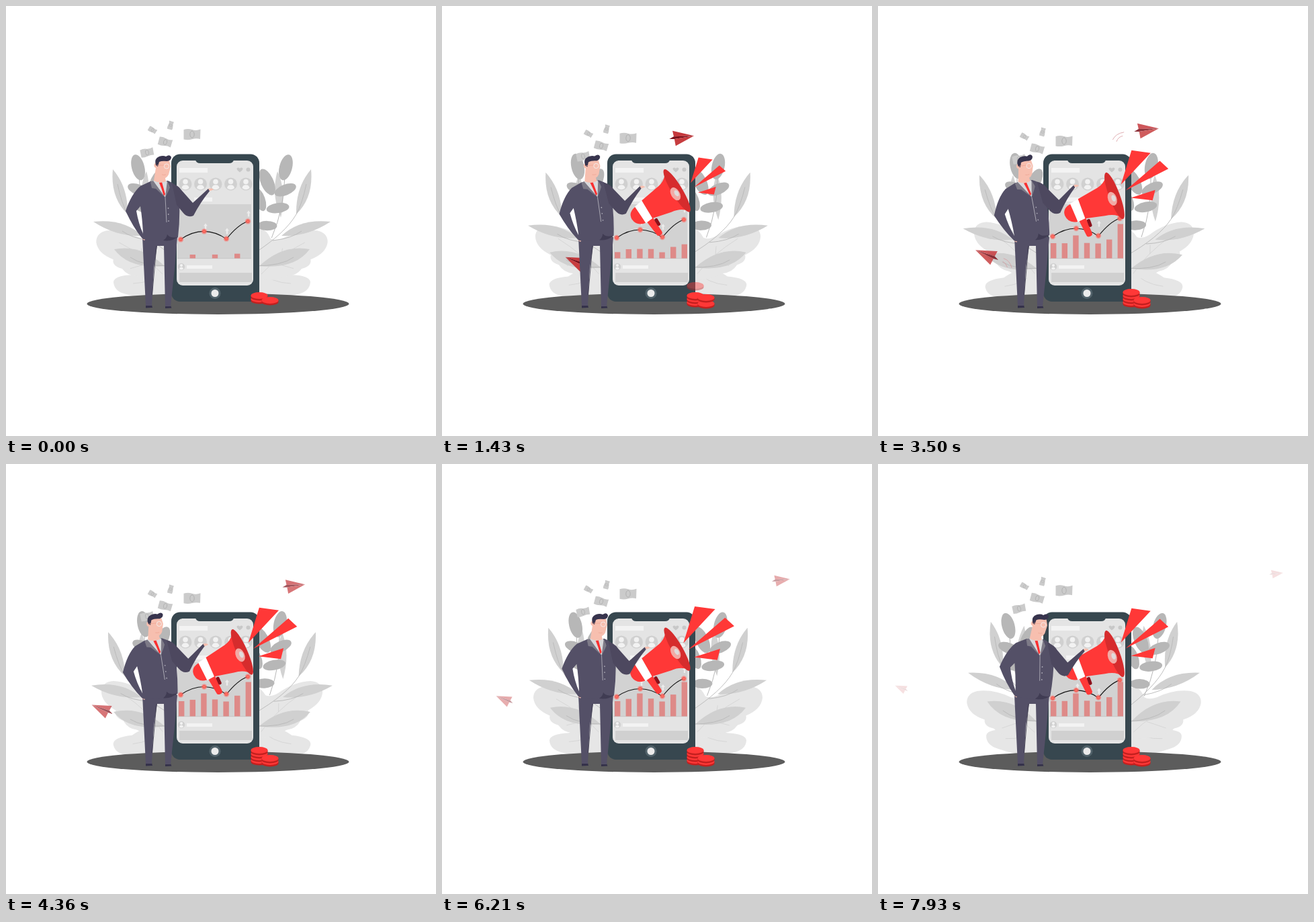
An HTML page for the animation above (8 s loop, 640 px wide and 640 px high).

```html
<!DOCTYPE html>
<html lang="en">
<head>
<meta charset="utf-8">
<title>Mobile marketing</title>
<style>
  html, body { margin: 0; width: 100%; height: 100%; overflow: hidden; background: #fff; }
  svg { display: block; width: 100vw; height: 100vh; }
</style>
</head>
<body>
<svg id="stage" viewBox="0 0 640 640">
  <defs>
    <g id="avatar">
      <circle r="9.5" fill="#d0d0d0"/>
      <circle cy="-3.5" r="3.8" fill="#f2f2f2"/>
      <path d="M-5.5 6Q-5 1.2 0 1.2Q5 1.2 5.5 6Q0 10.5-5.5 6Z" fill="#f2f2f2"/>
    </g>
    <path id="arrow" d="M0-4.5L3-.5H1.2V4.5H-1.2V-.5H-3Z" fill="#ececec"/>
    <g id="note">
      <path d="M-12.5-7Q-6-9 0-7T12.5-7.5L12 7Q6 5.5 0 7.2T-12.5 7.5Z" fill="#cbcbcb"/>
      <ellipse rx="3.2" ry="5" fill="none" stroke="#aaa" stroke-width=".8"/>
    </g>
    <g id="coin">
      <path d="M-12.5 0V2.5A12.5 5 0 0 0 12.5 2.5V0Z" fill="#c4201f"/>
      <ellipse rx="12.5" ry="5" fill="#ff3837"/>
    </g>
    <g id="plane">
      <path d="M-15-11L19-3L-13-2Z" fill="#c5383c"/>
      <path d="M-13-2L19-3L-12 2L-20 2Z" fill="#7a0e18"/>
      <path d="M-12 2L19-3L-10 13Z" fill="#c73d3f"/>
    </g>
  </defs>

  <g id="foliage">
    <g id="lowerLobe">
      <path d="M370 385Q405 388 424 400Q452 401 453 411Q452 425 434 429Q400 438 370 434Z" fill="#e6e6e6"/>
      <path d="M376 394Q395 412 424 413" fill="none" stroke="#d3d3d3" stroke-width=".8"/>
    </g>
    <g id="upperLobe">
      <path d="M370 335Q384 326 393 346Q400 350 412 345Q438 331 462 333Q478 336 478 350Q476 367 453 376Q455 386 440 390Q432 401 418 401Q395 412 370 405Z" fill="#e6e6e6"/>
      <path d="M380 399Q404 372 444 351M409 373L411 360M399 382L428 390" fill="none" stroke="#d3d3d3" stroke-width=".8"/>
    </g>
    <g id="paleBranch">
      <path d="M409 315Q394 280 404 246Q418 275 409 315Z" fill="#d2d2d2"/>
      <path d="M432 310Q431 270 454 243Q458 285 432 310Z" fill="#d0d0d0"/>
      <path d="M410 342Q438 316 483 321Q448 344 410 342Z" fill="#d0d0d0"/>
      <path d="M377 387Q412 354 452 362Q430 392 377 387Z" fill="#d0d0d0"/>
      <path d="M447 265Q441 294 432 310Q416 338 368 369M397 349Q425 346 440 335M370 387Q410 387 428 374" fill="none" stroke="#b9b9b9" stroke-width=".9"/>
    </g>
    <g id="darkBranch" fill="#b7b7b7">
      <path d="M414 253Q414 300 395 345" fill="none" stroke="#b0b0b0" stroke-width=".9"/>
      <ellipse cx="415.5" cy="240" rx="9.5" ry="19.5" transform="rotate(14 415.5 240)"/>
      <ellipse cx="388" cy="262" rx="9.5" ry="21" transform="rotate(-24 388 262)"/>
      <ellipse cx="415" cy="273.5" rx="17" ry="8" transform="rotate(-22 415 273.5)"/>
      <ellipse cx="404" cy="300.5" rx="17" ry="7.5" transform="rotate(-8 404 300.5)"/>
      <ellipse cx="377" cy="288" rx="8" ry="18" transform="rotate(-20 377 288)"/>
      <ellipse cx="388" cy="327" rx="15" ry="7.2"/>
    </g>
  </g>
  <use href="#foliage" transform="translate(613) scale(-1 1)"/>
  <ellipse cx="315.5" cy="443.2" rx="195" ry="15.7" fill="#5c5c5c"/>
  <g id="notes"></g>

  <g id="phone">
    <rect x="246" y="220.5" width="131" height="219.5" rx="13" fill="#37474f"/>
    <rect x="254" y="230" width="114" height="186" rx="9" fill="#e4e4e4"/>
    <path d="M282 229H339Q338 234 332 234H289Q283 234 282 229Z" fill="#37474f"/>
    <circle cx="311" cy="427.5" r="8.5" fill="#52636b"/>
    <circle cx="311" cy="427.5" r="5.5" fill="#ebebeb"/>
    <path d="M258 241H300V248H258ZM280 285H307V291H280ZM269 386H307V391H269Z" fill="#f3f3f3"/>
    <path d="M348 247.5Q342 243 344 241Q347 239.5 348 242Q349 239.5 352 241Q354 243 348 247.5Z" fill="#c8c8c8"/>
    <circle cx="360.5" cy="243.5" r="3" fill="#c8c8c8"/>
    <g id="avatars"></g>
    <rect x="255" y="295" width="110" height="80.5" fill="#d2d2d2"/>
    <path d="M255 375.7H365" stroke="#b5b5b5" stroke-width=".6"/>
    <rect x="258" y="397" width="108" height="14" fill="#d0d0d0"/>
    <g id="bars" fill="#de8a88"></g>
    <g id="arrows">
      <use href="#arrow" x="297" y="327"/><use href="#arrow" x="329" y="334"/><use href="#arrow" x="361" y="308"/>
    </g>
    <g id="graph"><path d="M260 347Q277 335 295 335Q313 335.5 328 346.5Q345 325 360 320" fill="none" stroke="#111" stroke-width="1.1"/></g>
  </g>

  <path id="rays" d="M377 214L406 218L361 266ZM420 230L433 242L368 275ZM413 274L409 290L376 286Z" fill="#ff3837"/>
  <g id="megaphone">
    <path d="M-25 20L-14 20L-13 45Q-13 49-17 49Q-22 49-22 46Z" fill="#ff3837"/>
    <rect x="-14" y="24" width="5" height="12" rx="2" fill="#8c111b"/>
    <path d="M-27-6.5Q-42-5-42 7Q-41 20-27 22Z" fill="#ff3837"/>
    <path d="M-28.5-7L-15-9.5V21.5L-27 22.5Z" fill="#fff"/>
    <path d="M-15-9.5L18-15Q32-18 38-31V41.500Q31 30 14 28L-15 21.5Z" fill="#ff3837"/>
    <ellipse cx="37.5" cy="5" rx="8" ry="36.8" fill="#d62c2d"/>
    <ellipse cx="33" cy="8" rx="6.5" ry="10.5" fill="#f2aaa5"/>
    <ellipse cx="35" cy="8" rx="3" ry="5" fill="#e0dcdc"/>
  </g>

  <g id="rightPlane">
    <use href="#plane"/>
    <path class="trail" d="M-54 15Q-49 5-36 3M-48 18Q-45 10-38 9" fill="none" stroke="#d99a9f"/>
  </g>
  <g id="leftPlane">
    <use href="#plane" transform="rotate(16) scale(-1 1)"/>
    <path class="trail" d="M27 5Q37 8 40 20M26 10Q31 13 33 19" fill="none" stroke="#d99a9f"/>
  </g>

  <g id="man">
    <path d="M208 445H217L218 449L208 449.5ZM237 446H245L246.5 449.5L237 450Z" fill="#34314a"/>
    <path d="M203 344H255L251 390L245 447H237L235 357H225L220 390L217 446H208Z" fill="#545067"/>
    <path d="M224 357L217.5 430" stroke="#39364a" stroke-width=".8"/>
    <g id="body">
      <path d="M202 343L207 342L208 346L206 349L203 347Z" fill="#f7bfaf"/>
      <path d="M215 261L241 260Q254 265 257 276Q260 310 256 344Q250 350 240 347Q220 351 204 347L202 345Q189 329 178 305Q187 279 200 268ZM200 298L194 305Q197 323 204 339Q203 317 200 298Z" fill="#545067" fill-rule="evenodd"/>
      <path d="M234 349Q239 346 240 340Q244 346 255 344Q247 351 234 349Z" fill="#403c53"/>
      <g id="arm">
        <path d="M301 272Q306 270 309 273.5L303 275.5Z" fill="#f7bfaf"/>
        <path d="M247 264Q257 267 262 275L278 293L301 272L303 275.5Q290 291 279 312Q270 316 263 307L254 296Z" fill="#4d485f"/>
      </g>
      <path d="M218 260L239 260L243 268L237 285Z" fill="#d9d9dc"/>
      <path d="M228 263L232 262L237 280L235 283L231.5 272Z" fill="#fa2f30"/>
      <path d="M215 262L219 260L237 285L223 272L217 271ZM240 260L244 270L242 275L237 285Z" fill="#7d7a87"/>
      <path d="M237 285L239 322" stroke="#c9c8ce" stroke-width=".7"/>
      <g fill="#aaa8b4"><circle cx="241.5" cy="301" r=".9"/><circle cx="241.7" cy="310" r=".9"/><circle cx="242" cy="320" r=".9"/></g>
      <path d="M226 230H243L245 239L242 251Q240 255 237 256L238 261Q229 265 220 260L223 241Q219 239 221 235Z" fill="#f7bfaf"/>
      <path d="M223 237Q220 227 228 224Q234 222 238 224Q244 220 246 225Q246 230 240 231Q232 230 228 232L226 239Z" fill="#37344d"/>
      <path d="M224 237H235.5M232 251Q235 252 238 251" fill="none" stroke="#eda391" stroke-width=".7"/>
      <circle cx="239" cy="238.5" r="3.6" fill="none" stroke="#f4eeee" stroke-width=".9"/>
    </g>
  </g>
  <g id="coins"></g>
</svg>

<script>
const LOOP = 8000;
const TURN = 3500;   // moment when the scene is at its calmest point
const $ = id => document.getElementById(id);
const clamp = v => Math.min(1, Math.max(0, v));
const wave = (t, peak, period) => Math.cos(2 * Math.PI * (t - peak) / period);
const move = (node, transform) => node.setAttribute("transform", transform);

function add(parent, name, attrs) {
  const node = document.createElementNS("http://www.w3.org/2000/svg", name);
  for (const key in attrs) node.setAttribute(key, attrs[key]);
  return parent.appendChild(node);
}

for (let i = 0; i < 5; i++) add($("avatars"), "use", { href: "#avatar", x: 267 + 22.5 * i, y: 265 });
add($("avatars"), "use", { href: "#avatar", transform: "translate(261 388) scale(.55)" });

for (const [x, y] of [[260, 347], [295, 335], [328, 346], [360, 320]]) {
  add($("graph"), "circle", { cx: x, cy: y, r: 4.2, fill: "#ff6b64", "fill-opacity": .55 });
  add($("graph"), "circle", { cx: x, cy: y, r: 2.3, fill: "#ff6f62", stroke: "#e8433f", "stroke-width": .6 });
}

for (const [x, y, angle, scale] of [
  [218, 185.5, 30, .5], [245, 178.5, -75, .5], [237, 203.5, 15, .8], [277, 192, 0, 1], [210, 219, -12, .78]
]) add($("notes"), "use", { href: "#note", transform: `translate(${x} ${y}) rotate(${angle}) scale(${scale})` });

const bars = [22.5, 26, 34, 26.5, 22, 32.5, 51].map((height, i) => ({
  height, node: add($("bars"), "rect", { x: 257 + 16.6 * i, width: 8.4 })
}));

const coins = [];
function stackCoins(x, base, dropTimes) {
  dropTimes.forEach((start, level) =>
    coins.push({ x, y: base - 5 * level, start, node: add($("coins"), "use", { href: "#coin" }) }));
}
stackCoins(377, 441, [-550, -550, 290, 1130]);
stackCoins(393, 443, [-550, 830]);

const planes = [
  { node: $("rightPlane"), rest: [400, 185], enter: [-10, 2.6], leave: [193, -21.5] },
  { node: $("leftPlane"), rest: [161.5, 371], enter: [9, 2.4], leave: [-127, -37] }
];

// Planes brake towards their resting place, then speed away while fading.
function drawPlanes(t, pop) {
  const s = (t - TURN) / 1000;
  const before = Math.min(0, s) ** 2, after = Math.max(0, s);
  const gone = .16 * after + .0148 * after * after;
  for (const { node, rest, enter, leave } of planes) {
    const [x, y] = rest.map((v, axis) => v + enter[axis] * before + leave[axis] * gone);
    move(node, `translate(${x} ${y}) scale(${pop * (.94 - .093 * after)})`);
    node.setAttribute("opacity", clamp(.84 - .155 * s));
    node.querySelector(".trail").setAttribute("opacity", clamp(1 - Math.abs(s) / .7));
  }
}

function drawLeaves(t, drift) {
  const sway = -.9 + (t < TURN ? .9 : 1.25) * (Math.abs(t - TURN) / TURN) ** 1.6;
  move($("paleBranch"), `rotate(${-3.8 * sway} 313 383)`);
  move($("darkBranch"), `rotate(${3.1 * drift} 375 400)`);
  move($("upperLobe"), `rotate(${8 * drift} 375 400)`);
  move($("lowerLobe"), `rotate(${-5.5 * sway} 375 420)`);
}

function drawBars(t) {
  bars.forEach(({ height, node }, i) => {
    const growth = i % 2 ? Math.sin((t + 900) / 4250) : clamp(t / TURN);
    node.setAttribute("y", 375.5 - height * growth);
    node.setAttribute("height", height * growth);
  });
}

function drawCoins(t) {
  for (const { x, y, start, node } of coins) {
    const p = clamp((t - start) / 800);
    move(node, `translate(${x} ${y - 16 * (1 - p)})`);
    node.setAttribute("opacity", clamp(1.8 * p - .25));
  }
}

function draw(t) {
  const lean = -wave(t, 3030, 9900) - .345;
  const drift = -.28 - .72 * wave(t, 3400, 10000);
  const pulse = wave(t, TURN, 4430);
  const pop = 1 - (1 - clamp((t - 350) / 750)) ** 3;

  drawLeaves(t, drift);
  move($("notes"), `translate(0 ${-9 * drift})`);
  move($("body"), `rotate(${5.73 * lean} 228 348)`);
  move($("arm"), `rotate(${-3.4 * lean} 255 275)`);
  move($("graph"), `translate(0 ${4 * drift})`);
  move($("arrows"), `translate(0 ${10 * drift})`);
  drawBars(t);

  const raySize = clamp((t - 700) / 1070) * (1.02 - .04 * pulse);
  move($("rays"), `translate(394 256) scale(${raySize}) translate(-394 -256)`);
  move($("megaphone"), `translate(310 290.5) rotate(${5.4 * pulse - 25.8}) scale(${pop}) translate(4.6 2.1)`);
  drawPlanes(t, pop);
  drawCoins(t);
}

const startTime = performance.now();
function tick() {
  draw((performance.now() - startTime) % LOOP);
  requestAnimationFrame(tick);
}
tick();
</script>
</body>
</html>
```
